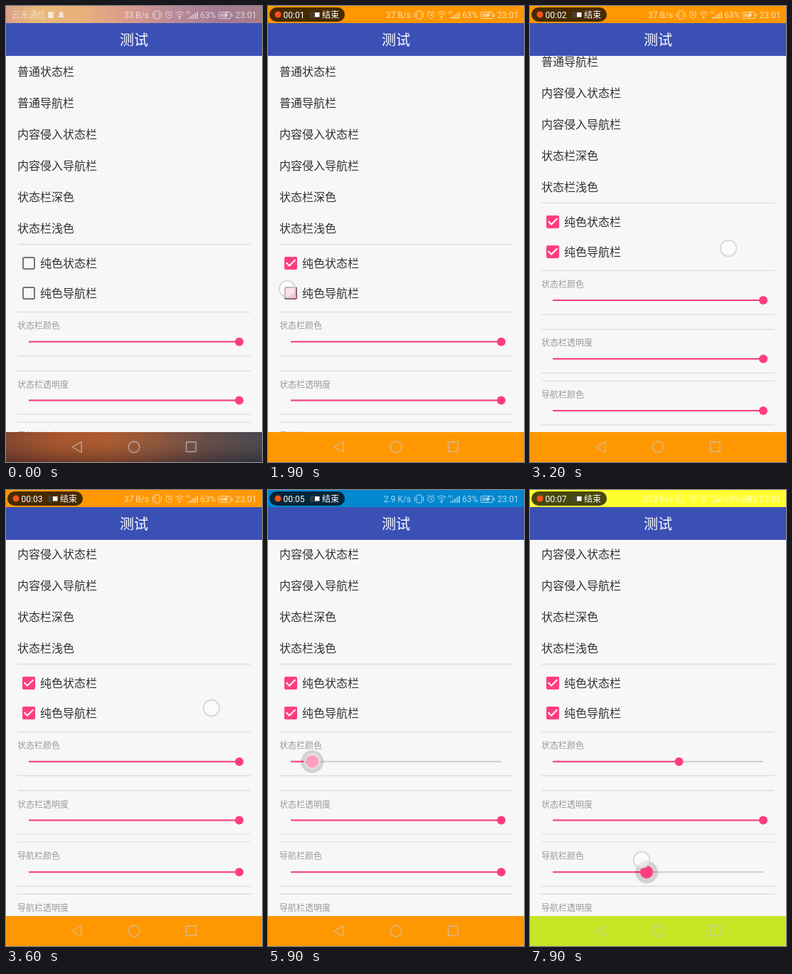
Write an HTML page that moves like this. It is 360x640 px and loops after 8000 ms.

```html
<!DOCTYPE html>
<html lang="zh-CN">
<head>
<meta charset="utf-8">
<title>测试</title>
<style>
  html, body { margin: 0; width: 100%; height: 100%; overflow: hidden; background: #f7f7f7; }
  svg { display: block; width: 360px; height: 640px; }
  text { font-family: Roboto, "Noto Sans CJK SC", "Noto Sans CJK", sans-serif; }
  .cjk { font-family: "Noto Sans CJK SC", "Noto Sans CJK", sans-serif; }
  .item { font-size: 16px; fill: #303030; }
  .label { font-size: 12px; fill: #9a9a9a; }
  .small { font-size: 12px; }
  .rule { stroke: #dedede; stroke-width: 1.3; }
  .line { fill: none; stroke: #fff; stroke-width: 1; }
</style>
</head>
<body>
<svg viewBox="0 0 360 640">
  <defs>
    <linearGradient id="sky">
      <stop offset="0" stop-color="#d9a08c"/>
      <stop offset=".12" stop-color="#e8b878"/>
      <stop offset=".3" stop-color="#e9b07c"/>
      <stop offset=".48" stop-color="#d79a8c"/>
      <stop offset=".65" stop-color="#b98a98"/>
      <stop offset=".85" stop-color="#a07a94"/>
      <stop offset="1" stop-color="#a98088"/>
    </linearGradient>
    <linearGradient id="dusk">
      <stop offset="0" stop-color="#7c3f2c"/>
      <stop offset=".2" stop-color="#a24e28"/>
      <stop offset=".4" stop-color="#a8552c"/>
      <stop offset=".6" stop-color="#84503c"/>
      <stop offset=".8" stop-color="#544447"/>
      <stop offset="1" stop-color="#384050"/>
    </linearGradient>
    <linearGradient id="shade" x2="0" y2="1">
      <stop offset="0" stop-color="#ffb060" stop-opacity=".06"/>
      <stop offset="1" stop-color="#1c1420" stop-opacity=".35"/>
    </linearGradient>
  </defs>

  <rect width="360" height="640" fill="#f7f7f7"/>
  <g id="page"></g>

  <rect y="24" width="360" height="46" fill="#3b50b5"/>
  <text class="cjk" x="180" y="54.7" font-size="20" fill="#fff" text-anchor="middle">测试</text>

  <rect width="360" height="24" fill="url(#sky)"/>
  <rect id="top" width="360" height="24"/>
  <g fill="#fff" opacity=".66">
    <text id="carrier" class="cjk small" x="8" y="17">云禾通信</text>
    <rect x="59" y="8" width="8" height="9" rx="1"/>
    <path id="bell" d="M73 16h9l-1.5-2v-3a3 3 0 0 0-6 0v3z"/>
    <text id="speed" class="small" x="201" y="17" text-anchor="end"></text>
    <g class="line">
      <rect x="209" y="7" width="7" height="11" rx="1"/>
      <path d="M206.5 9v7M218.5 9v7"/>
      <circle cx="229" cy="13" r="4.2"/>
      <path d="M229 10.5v3h2M224 9l2.5-2M234 9l-2.5-2"/>
      <path d="M238 10.5q6-5 12 0M240 13q4-3.5 8 0M242 15.3q2-1.8 4 0"/>
      <rect x="299" y="8.5" width="17" height="9" rx="1.5"/>
    </g>
    <circle cx="244" cy="17" r="1.2"/>
    <text x="253" y="11" font-size="5.5">4G</text>
    <path d="M256 18v-2h2v2zM259 18v-4h2v4zM262 18v-6h2v6zM265 18v-8h2v8zM268 18v-10h2v10z" opacity=".8"/>
    <text class="small" x="273" y="17">63%</text>
    <path d="M301 10.5h9v5h-9zM317 11h2v4h-2z" opacity=".6"/>
    <path d="M310 9l-4 4.5h3l-1 3.5 5-5h-3l2-3z"/>
    <text class="small" x="322.5" y="17">23:01</text>
  </g>
  <g id="pill">
    <rect x="2" y="2" width="106" height="20" rx="10" fill="#000" fill-opacity=".72"/>
    <circle cx="14" cy="12" r="4.5" fill="#f4511e"/>
    <text id="clock" class="small" x="21.5" y="17" fill="#fff"></text>
    <rect x="66" y="9" width="6.5" height="6.5" fill="#fff"/>
    <text class="cjk small" x="76" y="16.8" fill="#fff">结束</text>
  </g>

  <rect y="598" width="360" height="42" fill="url(#dusk)"/>
  <rect y="598" width="360" height="42" fill="url(#shade)"/>
  <rect id="bottom" y="598" width="360" height="42"/>
  <g fill="none" stroke="#c8c4c4" stroke-opacity=".75" stroke-width="1.4" stroke-linejoin="round">
    <path d="M106 611.5v15l-13-7.5z"/>
    <circle cx="180" cy="619" r="7.8"/>
    <rect x="253.5" y="612" width="13.5" height="13.5" rx=".5"/>
  </g>

  <circle id="touch" r="11.3" fill="#fff" fill-opacity=".5" stroke="#d3d8dc" stroke-width="1.8"/>
</svg>
<script>
const LOOP = 8000, PINK = '#ff3d7f', MIN = 32, MAX = 328;
const $ = id => document.getElementById(id);
const clamp = (v, a = 0, b = 1) => Math.min(b, Math.max(a, v));
const ramp = (t, start, len) => clamp((t - start) / len);

function add(parent, tag, attrs, text) {
  const el = document.createElementNS('http://www.w3.org/2000/svg', tag);
  set(el, attrs);
  if (text) el.textContent = text;
  return parent.appendChild(el);
}
function set(el, attrs) {
  for (const k in attrs) el.setAttribute(k, attrs[k]);
}

// Linear path through [key, ...values] points, held at both ends.
function follow(points, t) {
  let i = 0;
  while (i < points.length - 2 && t > points[i + 1][0]) i++;
  const a = points[i], b = points[i + 1];
  const p = ramp(t, a[0], b[0] - a[0]);
  return a.slice(1).map((v, n) => v + (b[n + 1] - v) * p);
}

const page = $('page');
['普通状态栏', '普通导航栏', '内容侵入状态栏', '内容侵入导航栏', '状态栏深色', '状态栏浅色']
  .forEach((s, i) => add(page, 'text', { class: 'cjk item', x: 16, y: 98 + 44 * i }, s));
[334.5, 429.5, 491, 512, 573.2, 584.2, 646, 657].forEach(y =>
  add(page, 'line', { class: 'rule', x1: 16, x2: 344, y1: y, y2: y }));
[['状态栏颜色', 449], ['状态栏透明度', 531.3], ['导航栏颜色', 603.8], ['导航栏透明度', 676.3]]
  .forEach(([s, y]) => add(page, 'text', { class: 'cjk label', x: 16, y: y + 4.2 }, s));

function checkbox(y, label) {
  add(page, 'text', { class: 'cjk item', x: 48, y: y + 5.6 }, label);
  const g = add(page, 'g', { transform: `translate(32 ${y})` });
  const frame = add(g, 'rect', { x: -8, y: -8, width: 16, height: 16, rx: 1.5,
    fill: 'none', stroke: '#757575', 'stroke-width': 2 });
  const box = add(g, 'rect', { x: -9, y: -9, width: 18, height: 18, rx: 2, fill: PINK });
  const tick = add(g, 'path', { d: 'M-6.3-.7l4.3 4.300 8.300-8.300', fill: 'none', stroke: '#fff',
    'stroke-width': 2, pathLength: 1, 'stroke-dasharray': '1 2' });
  return p => {
    const drawn = ramp(p, 0.45, 0.55);
    set(frame, { opacity: p > 0.3 ? 0 : 1 });
    set(box, { opacity: clamp(p * 3), transform: `scale(${1 - 0.1 * Math.sin(p * Math.PI)})` });
    set(tick, { opacity: drawn > 0 ? 1 : 0, 'stroke-dashoffset': 1 - drawn });
  };
}

function slider(y) {
  const line = { x1: MIN, x2: MAX, y1: y, y2: y, 'stroke-width': 2 };
  add(page, 'line', { ...line, stroke: '#cdcdcd' });
  const bar = add(page, 'line', { ...line, stroke: PINK });
  const halo = add(page, 'circle', { cy: y, fill: '#000', 'fill-opacity': 0.15 });
  const thumb = add(page, 'circle', { cy: y, fill: PINK });
  return (x, press) => {
    set(bar, { x2: x });
    set(halo, { cx: x, r: 16 * press });
    set(thumb, { cx: x, r: 6 + 3 * press });
  };
}

const checkTop = checkbox(361, '纯色状态栏');
const checkNav = checkbox(403, '纯色导航栏');
const topHue = slider(471.2);
slider(553.4)(MAX, 0);
const navHue = slider(626.2);

const hues = [
  [0, 0, 120, 215], [0.1, 2, 136, 209], [0.28, 0, 170, 110], [0.45, 202, 232, 36],
  [0.6, 255, 255, 48], [0.8, 255, 203, 24], [1, 255, 152, 0]
];
const hue = x => `rgb(${follow(hues, (x - MIN) / (MAX - MIN)).map(Math.round)})`;

const topDrag = [[4350, MAX], [5000, 165], [5900, 62], [6550, 209.5]];
const navDrag = [[7050, MAX], [7900, 164]];

// Each gesture is a list of [time, x, y].
const gestures = [
  [[920, 27, 352], [1040, 27, 352]],
  [[1780, 27, 397], [1920, 27, 397]],
  [[2720, 265, 398], [2850, 265, 398], [3200, 279, 340], [3600, 289, 306], [3680, 289, 306]],
  [[4200, 326, 383], [4350, 326, 383], [5000, 162, 384], [5900, 62, 381], [6550, 209, 381], [6650, 209, 381]],
  [[6920, 326, 536], [7050, 326, 536], [7900, 157, 519], [8000, 157, 519]]
];
const FADE = 140;
const press = (t, from, to) => Math.min(ramp(t, from, 150), 1 - ramp(t, to, 150));

function draw(t) {
  const tapTop = 1000, tapNav = 1880, record = 400;
  const x1 = follow(topDrag, t)[0], x2 = follow(navDrag, t)[0];

  checkTop(ramp(t, tapTop, 230));
  checkNav(ramp(t, tapNav, 230));
  topHue(x1, press(t, 4220, 6620));
  navHue(x2, press(t, 6940, LOOP));
  set($('top'), { fill: hue(x1), opacity: t < tapTop ? 0 : 1 });
  set($('bottom'), { fill: hue(x2), opacity: t < tapNav ? 0 : 1 });

  const swipe = follow(gestures[2], t);
  set(page, { transform: `translate(0 ${-clamp(398 - swipe[1], 0, 90)})` });

  const shown = ramp(t, 250, 150);
  set($('pill'), { opacity: shown });
  set($('carrier'), { opacity: 0.8 * (1 - shown) });
  set($('bell'), { opacity: 1 - shown });
  $('clock').textContent = '00:0' + Math.max(0, Math.floor((t - record) / 1000));
  $('speed').textContent = t < 600 ? '33 B/s' : t < 4000 ? '37 B/s' : t < 6800 ? '2.9 K/s' : '353 B/s';

  const g = gestures.find(p => t >= p[0][0] && t < p[p.length - 1][0] + FADE);
  if (g) {
    const [x, y] = follow(g, t);
    set($('touch'), { cx: x, cy: y, opacity: 1 - ramp(t, g[g.length - 1][0], FADE) });
  } else set($('touch'), { opacity: 0 });
}

const begin = performance.now();
function tick() {
  draw((performance.now() - begin) % LOOP);
  requestAnimationFrame(tick);
}
tick();
</script>
</body>
</html>
```
